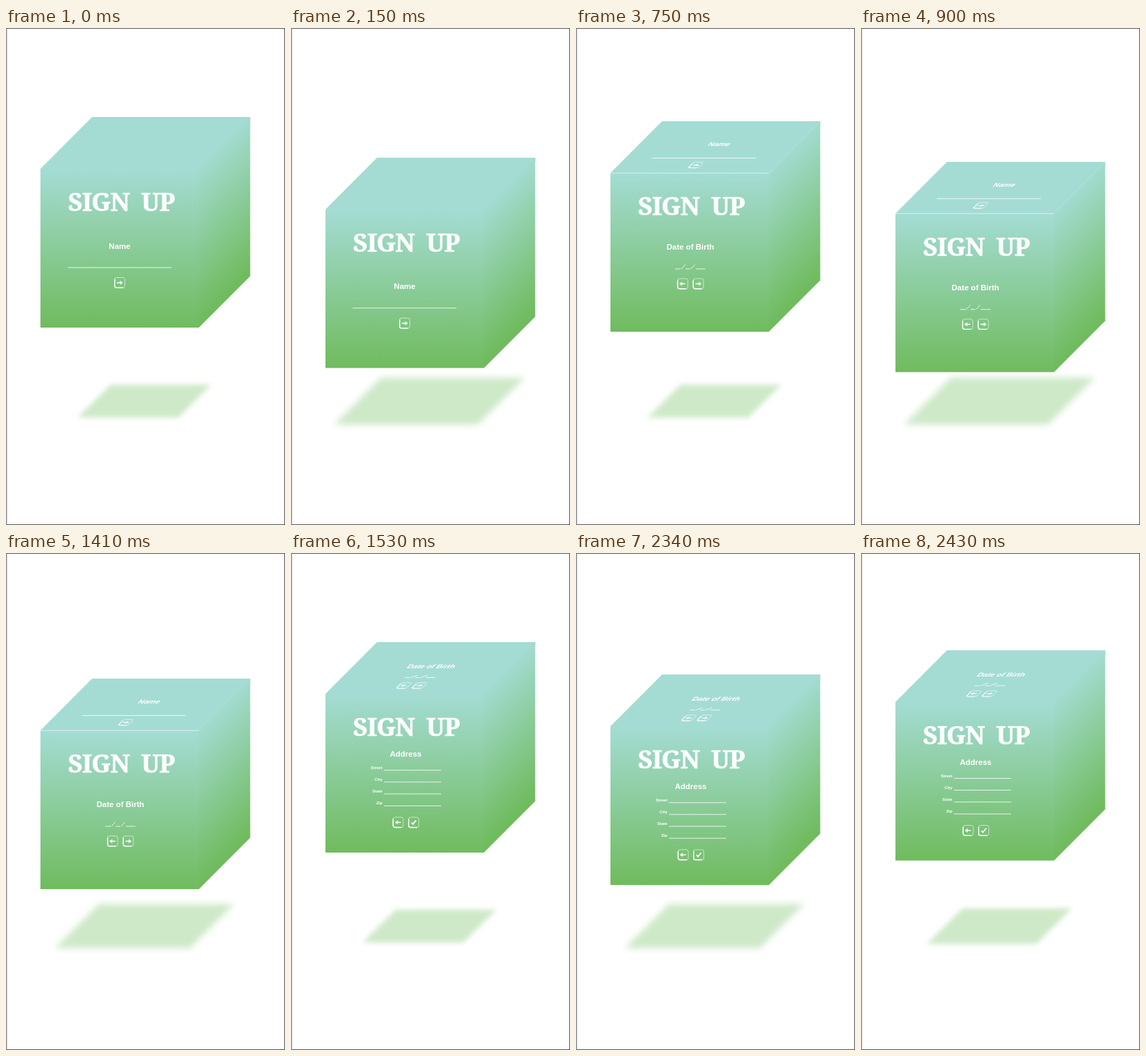
Recreate the animation shown at these times as an HTML page. Size 405 by 720 pixels, loop 2.46 s.

```html
<!DOCTYPE html>
<html lang="en">
<head>
<meta charset="utf-8">
<title>Sign up cube</title>
<style>
  @property --drop { syntax: "<number>"; inherits: true; initial-value: 0; }

  html, body { margin: 0; width: 100%; height: 100%; overflow: hidden; background: #fff; }
  svg { display: block; width: 100%; height: 100%; animation: hop 2460ms infinite; }

  .cube { transform: translateY(calc(var(--drop) * 58.7px)); }
  .shadow {
    transform: translate(201px, 540.5px) scale(calc(.7 + .3 * var(--drop)));
    fill: #cee9c8;
  }

  .title { font: 700 36.5px "Noto Serif", serif; letter-spacing: -1px; stroke: #fff; stroke-width: .7px; }
  .head { font: 700 11.5px "Liberation Sans", Arial, sans-serif; }
  .label { font: 700 6px "Liberation Sans", Arial, sans-serif; text-anchor: end; }
  .ink { fill: #fff; text-anchor: middle; }
  .rule { fill: none; stroke: #fff; stroke-opacity: .8; }

  .step { opacity: 0; animation: 2460ms step-end infinite; }
  .name { animation-name: first; }
  .birth { animation-name: second; }
  .address { animation-name: third; }

  /* 0 is the top of the hop, 1 is the resting height */
  @keyframes hop {
    0%      { --drop: 0; animation-timing-function: steps(5, end); }
    6.097%  { --drop: 1; animation-timing-function: step-end; }
    24.39%  { --drop: 1; animation-timing-function: steps(5, end); }
    30.487% { --drop: 0; animation-timing-function: steps(5, end); }
    36.585% { --drop: 1; animation-timing-function: step-end; }
    56.097% { --drop: 1; animation-timing-function: steps(5, end); }
    62.195% { --drop: 0; animation-timing-function: steps(5, end); }
    68.292% { --drop: 1; animation-timing-function: step-end; }
    93.902% { --drop: 1; animation-timing-function: steps(5, end); }
    100%    { --drop: 0; }
  }
  @keyframes first  { 0% { opacity: 1; } 30.487%, 100% { opacity: 0; } }
  @keyframes second { 0% { opacity: 0; } 30.487% { opacity: 1; } 62.195%, 100% { opacity: 0; } }
  @keyframes third  { 0% { opacity: 0; } 62.195%, 100% { opacity: 1; } }
</style>
</head>
<body>
<svg viewBox="0 0 405 720">
  <defs>
    <linearGradient id="frontFill" gradientUnits="userSpaceOnUse" x1="0" y1="204" x2="0" y2="434">
      <stop offset="0" stop-color="#a4dcd4"/>
      <stop offset="1" stop-color="#70bb5e"/>
    </linearGradient>
    <linearGradient id="sideFill" gradientUnits="userSpaceOnUse" x1="276" y1="200" x2="391" y2="315">
      <stop offset="0" stop-color="#a4dcd4"/>
      <stop offset="1" stop-color="#70bb5e"/>
    </linearGradient>
    <filter id="soft" x="-20%" y="-40%" width="140%" height="180%" color-interpolation-filters="sRGB">
      <feGaussianBlur stdDeviation="5"/>
    </filter>

    <g id="box">
      <path d="M50 210V204L125 129H354.5V135L280 210Z" fill="#a4dcd4"/>
      <path d="M50 204H280V434H50Z" fill="url(#frontFill)"/>
      <path d="M280 204L354.5 129V359.5L280 434Z" fill="url(#sideFill)"/>
      <text class="title" y="265.3"><tspan x="134.5">SIGN</tspan><tspan x="220.5">UP</tspan></text>
    </g>

    <g id="key" fill="none" stroke="#fff">
      <rect x="-7.5" y="-7.5" width="15" height="15" rx="3" stroke-width=".8" stroke-opacity=".75"/>
      <path d="M-7.2 -5V4.5Q-7.2 7.2 -4.5 7.2H5" stroke-width="1.4"/>
    </g>
    <g id="next">
      <use href="#key"/>
      <path d="M-4 -.8H.6V-3L4.8 0L.6 3V.8H-4Z" fill="#fff"/>
    </g>
    <g id="back">
      <use href="#key"/>
      <path d="M4 -.8H-.6V-3L-4.8 0L-.6 3V.8H4Z" fill="#fff"/>
    </g>
    <g id="done">
      <use href="#key"/>
      <path d="M-3.2 .2L-1 2.6L3.6 -3" fill="none" stroke="#fff" stroke-width="1.8"/>
    </g>
    <path id="date" class="rule" d="M-22 0H-14M-13 0L-7 -6.5M-7 0H0M1 0L7 -6.5M8 0H22"/>
    <path id="field" class="rule" d="M135 0H218"/>
  </defs>

  <g class="shadow">
    <path d="M-70.5 -34H138.5L70.5 34H-138.5Z" filter="url(#soft)"/>
  </g>

  <g class="cube ink">
    <g class="step name">
      <use href="#box"/>
      <text class="head" x="165" y="319.6">Name</text>
      <path class="rule" d="M89.5 347H240"/>
      <use href="#next" x="165" y="369"/>
    </g>

    <g class="step birth">
      <g transform="translate(0 6)">
        <use href="#box"/>
        <path class="rule" d="M50 204.2H280" stroke-opacity=".6" opacity=".75"/>
        <path class="rule" d="M280 204L354.5 129.5" opacity=".25"/>
        <text class="head" transform="matrix(1 0 -.6 .7 206 165)">Name</text>
        <path class="rule" d="M110 182.5H261"/>
        <use href="#next" transform="matrix(1 0 -.55 .56 174 192.5)"/>
        <text class="head" x="166" y="315.2">Date of Birth</text>
        <use href="#date" x="166" y="343"/>
        <use href="#back" x="154.8" y="364.5"/>
        <use href="#next" x="177.5" y="364.5"/>
      </g>
    </g>

    <g class="step address">
      <use href="#box"/>
      <text class="head" transform="matrix(1 0 -.6 .7 201.5 167)">Date of Birth</text>
      <use href="#date" transform="matrix(1 0 -.6 .56 187 180.5)"/>
      <use href="#back" transform="matrix(1 0 -.55 .56 164 192)"/>
      <use href="#next" transform="matrix(1 0 -.55 .56 186.5 192)"/>
      <text class="head" x="166.5" y="295.4">Address</text>
      <g class="label">
        <text x="132.7" y="313.3">Street</text>
        <text x="132.7" y="330.3">City</text>
        <text x="132.7" y="347.3">State</text>
        <text x="132.7" y="364.3">Zip</text>
      </g>
      <use href="#field" y="314.7"/>
      <use href="#field" y="331.8"/>
      <use href="#field" y="349"/>
      <use href="#field" y="366.3"/>
      <use href="#back" x="155.5" y="390.3"/>
      <use href="#done" x="178" y="390.3"/>
    </g>
  </g>

  <rect x=".8" y=".5" width="403.7" height="719" fill="none" stroke="#555"/>
</svg>
</body>
</html>
```
